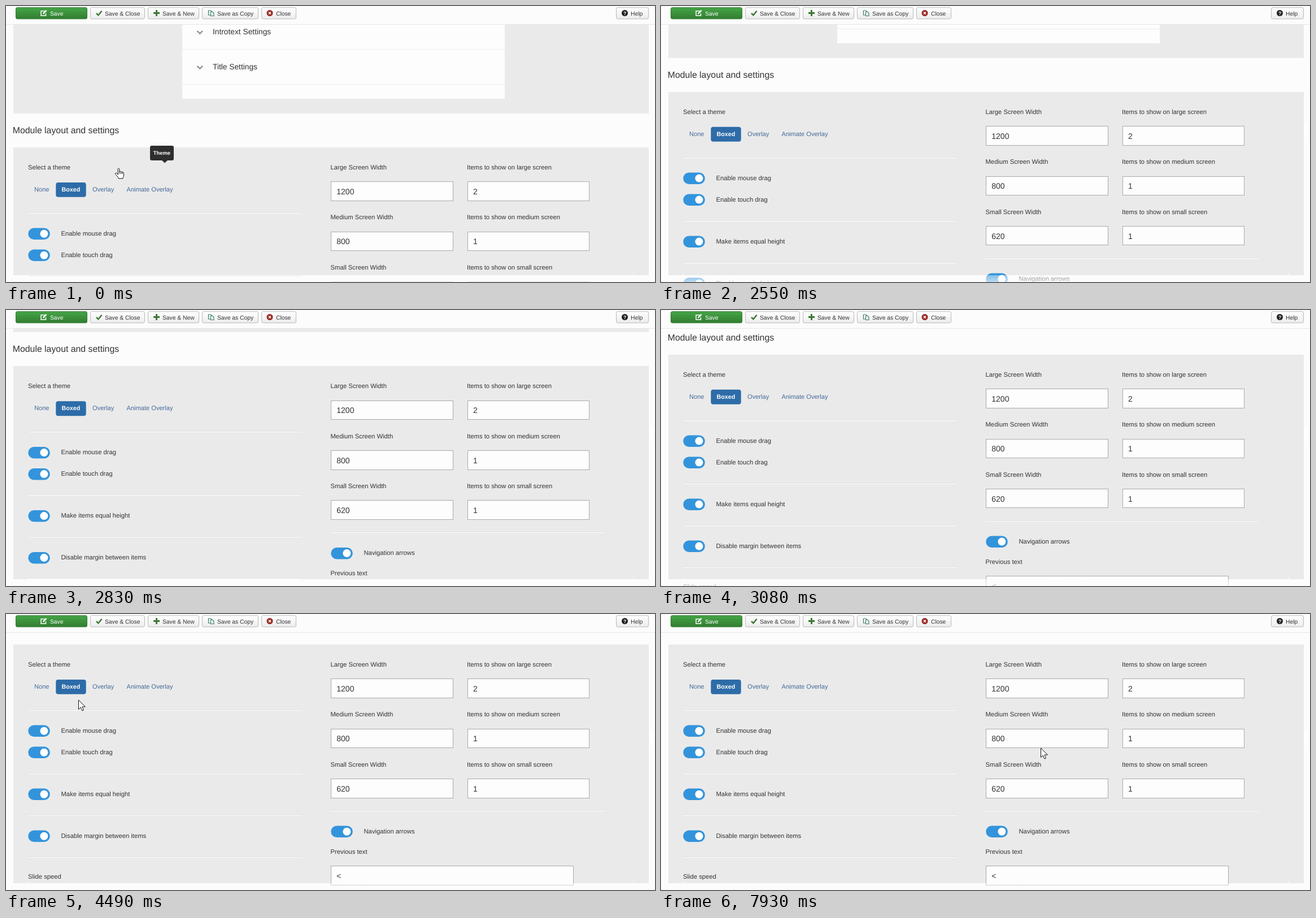
Recreate the animation shown at these times as an HTML page. Size 1149 by 488 pixels, loop 8000 ms.

```html
<!DOCTYPE html>
<html lang="en">
<head>
<meta charset="utf-8">
<title>Module settings</title>
<style>
  html, body { margin: 0; width: 100%; height: 100%; overflow: hidden; background: #fcfcfc; }
  svg { display: block; }
  text { font-family: "Liberation Sans", Arial, sans-serif; text-rendering: geometricPrecision; white-space: pre; }
  .crisp { shape-rendering: crispEdges; }
</style>
</head>
<body>
<svg id="stage" width="1149" height="488" viewBox="0 0 1149 488">
  <defs>
    <linearGradient id="green" x2="0" y2="1"><stop stop-color="#46a546"/><stop offset="1" stop-color="#317d31"/></linearGradient>
    <linearGradient id="plain" x2="0" y2="1"><stop stop-color="#fff"/><stop offset="1" stop-color="#ececec"/></linearGradient>
    <linearGradient id="fade" x2="0" y2="1">
      <stop stop-color="#fcfcfc" stop-opacity=".4"/><stop offset="1" stop-color="#fcfcfc" stop-opacity=".68"/>
    </linearGradient>
  </defs>
  <rect id="panel" class="crisp" x="13" width="1125" fill="#eaeaea"/>
  <g id="page"></g>
  <rect y="476" width="1149" height="12" fill="url(#fade)"/>
  <path d="M39.5 473v4M1111.5 472v5" stroke="#fff"/>
  <rect id="patch" x="1138" y="208" width="7" height="24" fill="#fff"/>
  <g id="bar"></g>
  <g id="tip">
    <rect x="255" y="247" width="42" height="26" rx="3" fill="#2e2e2e"/>
    <path d="M276 273h10l-5 4.5z" fill="#2e2e2e"/>
  </g>
  <g id="cursor" stroke-linejoin="round" stroke-linecap="round">
    <path id="arrow" d="M.5.5v16l3.8-3.5 2.6 6 2.7-1.1-2.6-5.9h5z" fill="#fff" stroke="#111"/>
    <path id="hand" d="M0 1.2C0-.6 2.8-.6 2.8 1.2V6c.5-1 2.6-.8 2.7.5.6-.9 2.5-.5 2.6.7.7-.7 2.3-.2 2.3 1.1V13c0 1.6-1.3 2.6-1.4 5H1.2C1 15.6-2.5 12.5-4.4 10.2-5.3 8.6-3.5 7.6-2.2 8.7L0 10.8zM2.8 6v3.5M5.5 6.500v3M8.1 7.2v2.5" fill="#fff" stroke="#111"/>
    <path id="beam" d="M-3.5-6.500h2.5L0-6 1-6.500h2.5M0-6V6M-3.5 6.500h2.5L0 6l1 .5h2.5" fill="none" stroke="#111" stroke-width="1.2"/>
  </g>
</svg>
<script>
const $ = id => document.getElementById(id);
const page = $('page'), bar = $('bar');

function add(parent, tag, attrs, body) {
  const el = document.createElementNS('http://www.w3.org/2000/svg', tag);
  for (const k in attrs) el.setAttribute(k, attrs[k]);
  if (body) el.textContent = body;
  parent.appendChild(el);
}
const rect = (g, x, y, width, height, fill, more) => add(g, 'rect', { x, y, width, height, fill, ...more });
const crisp = (x, y, width, height, fill) => rect(page, x, y, width, height, fill, { class: 'crisp' });
const text = (g, x, y, size, fill, str, weight = 400) =>
  add(g, 'text', { x, y, 'font-size': size, fill, 'font-weight': weight }, str);
const path = (g, d, stroke, width = 1, fill = 'none') => add(g, 'path', { d, stroke, 'stroke-width': width, fill });

const label = (x, mid, str) => text(page, x - .5, mid + 4, 11.25, '#333', str);
function rule(x, y, width) {
  crisp(x, y - 1, width, 1, '#e0e0e0');
  crisp(x, y, width, 1, '#fff');
}
function toggle(x, mid, str) {
  rect(page, x + .3, mid - 9.5, 38.5, 20.5, '#3394dc', { rx: 10.25 });
  add(page, 'circle', { cx: x + 28.4, cy: mid + .7, r: 7, fill: '#fff' });
  label(x + 59, mid, str);
}
function field(x, y, width, str) {
  const height = 34.5;
  crisp(x, y, width, height, '#aaa');
  crisp(x + 1, y + 1, width - 2, height - 2, '#fdfdfd');
  text(page, x + 10.3, y + 22.7, 14, '#333', str);
}

// Page content, at scroll position 0
crisp(13, 0, 1125, 190, '#eaeaea');
crisp(312, 0, 571, 164, '#fdfdfd');
['Introtext Settings', 'Title Settings'].forEach((str, i) => {
  const y = 45 + i * 62;
  path(page, `M338.5 ${y - 1}l4.8 4.8 4.8-4.8`, '#8a9290', 2.4);
  text(page, 366, y + 5, 13.75, '#333', str);
  crisp(312, y + 31, 571, 1, '#ebebeb');
});
text(page, 11.8, 225, 15.83, '#333', 'Module layout and settings');

label(39.5, 285, 'Select a theme');
rect(page, 88.3, 311.9, 53.4, 25.9, '#2d6ca8', { rx: 4 });
[[50, 'None'], [153, 'Overlay'], [213.5, 'Animate Overlay']].forEach(([x, s]) => text(page, x, 328, 11.1, '#44699a', s));
text(page, 98.5, 328, 10.7, '#fff', 'Boxed', 700);

[366, 478, 552, 626].forEach(y => rule(40, y, 483));
toggle(39, 402, 'Enable mouse drag');
toggle(39, 440, 'Enable touch drag');
toggle(39, 514, 'Make items equal height');
toggle(39, 588, 'Disable margin between items');
label(39.5, 660, 'Slide speed');

[['Large', '1200', '2'], ['Medium', '800', '1'], ['Small', '620', '1']].forEach(([size, width, count], i) => {
  const y = 285 + i * 88.4;
  label(575, y, size + ' Screen Width');
  label(816.5, y, `Items to show on ${size.toLowerCase()} screen`);
  field(575, y + 25.2, 217.3, width);
  field(816.6, y + 25.2, 216, count);
});
rule(575, 544, 484);
toggle(575, 580, 'Navigation arrows');
label(575, 616, 'Previous text');
field(575, 641, 430, '<');

// Toolbar
rect(bar, 0, 0, 1149, 32, '#fcfcfc');
rect(bar, 0, 32, 1149, 1, '#e6e6e6');
[
  [17, 127, 78, 'Save'], [149, 97, 175, 'Save & Close'], [251, 91, 277, 'Save & New'],
  [347, 100, 374, 'Save as Copy'], [452, 62, 478, 'Close'], [1080, 58, 1106, 'Help']
].forEach(([x, width, tx, str], i) => {
  rect(bar, x + .5, 2.8, width - 1, 20, i ? 'url(#plain)' : 'url(#green)', { rx: 2.5, stroke: i ? '#b9b9b9' : '#2f7a2f' });
  text(bar, tx, 16.5, 10.3, i ? '#333' : '#fff', str);
});
path(bar, 'M69 9h-7v8h8.5v-4', '#fff', 1.5);
path(bar, 'M65.5 13.8l6-6', '#fff', 2.4);
path(bar, 'M160 12.8l3.5 3.5 6-7.5', '#39772f', 2.4);
path(bar, 'M261 12.5h11M266.5 7v11', '#39772f', 2.8);
path(bar, 'M358.5 8h4l2 2v6h-6z', '#3c7f68', 1.2, '#fff');
path(bar, 'M362.5 10.5h3.5l2 2v5h-5.5z', '#3c7f68', 1.2, '#fff');
add(bar, 'circle', { cx: 467, cy: 12.5, r: 5.5, fill: '#9b2a26' });
path(bar, 'M465 10.5l4 4M469 10.5l-4 4', '#fff', 1.5);
add(bar, 'circle', { cx: 1095.5, cy: 12.5, r: 5.5, fill: '#222' });
text(bar, 1092.9, 15.7, 8.8, '#fff', '?', 700);
text($('tip'), 260.8, 263, 9.4, '#fff', 'Theme', 700);

// Motion: [time, scroll]
const scrolls = [[0, 0], [2550, 98.1], [2670, 130], [2830, 150.6], [2950, 162], [3080, 171.1], [3230, 196]];

// Pointer runs: start, end, then evenly spaced stops [x, y, shape]
const A = 'arrow', H = 'hand', I = 'beam', gone = [0, 0, ''];
const runs = [
  [0, 0, [[198, 287, H]]],
  [720, 980, [[400, 268, A], [668, 228, A], gone]],
  [1380, 1930, [[1123, 211, A], [1127, 210, A], [1130, 209, A], [1133, 208, A], gone]],
  [3630, 4490, [[556, 51, A], [420, 76, A], [250, 146, A], [90, 148, A], [20, 150, A], [80, 153, A], [128, 152, A]]],
  [5170, 6140, [[145, 163, A], [205, 181, A], [290, 190, A], [380, 186, A], [460, 172, A], [540, 155, A], [600, 141, I], [636, 138, I]]],
  [6260, 7250, [[726, 146, I], [765, 141, I], [803, 137, A], [832, 135, I], [850, 137, I], [842, 160, A], [842, 188, A], [844, 215, I]]],
  [7380, 7930, [[780, 222, I], [720, 229, I], [685, 230, I], [672, 237, A]]]
];
const latest = (rows, t) => rows.filter(r => r[0] <= t).pop();

function pointer(t) {
  const [from, to, stops] = latest(runs, t);
  const last = stops.length - 1;
  const i = to > from ? Math.min(last, Math.floor((t - from) / (to - from) * last + 1e-6)) : 0;
  return stops[i];
}

function draw(t) {
  const scroll = latest(scrolls, t)[1];
  page.setAttribute('transform', `translate(0 ${-scroll})`);
  $('panel').setAttribute('y', 250 - scroll);
  $('panel').setAttribute('height', 226 + scroll);
  $('tip').style.display = t < 720 ? '' : 'none';
  $('patch').style.display = t >= 1930 ? '' : 'none';
  const [x, y, shape] = pointer(t);
  $('cursor').setAttribute('transform', `translate(${x} ${y})`);
  for (const s of [A, H, I]) $(s).style.display = s === shape ? '' : 'none';
}

const start = performance.now();
function tick() {
  draw((performance.now() - start) % 8000);
  requestAnimationFrame(tick);
}
tick();
</script>
</body>
</html>
```
